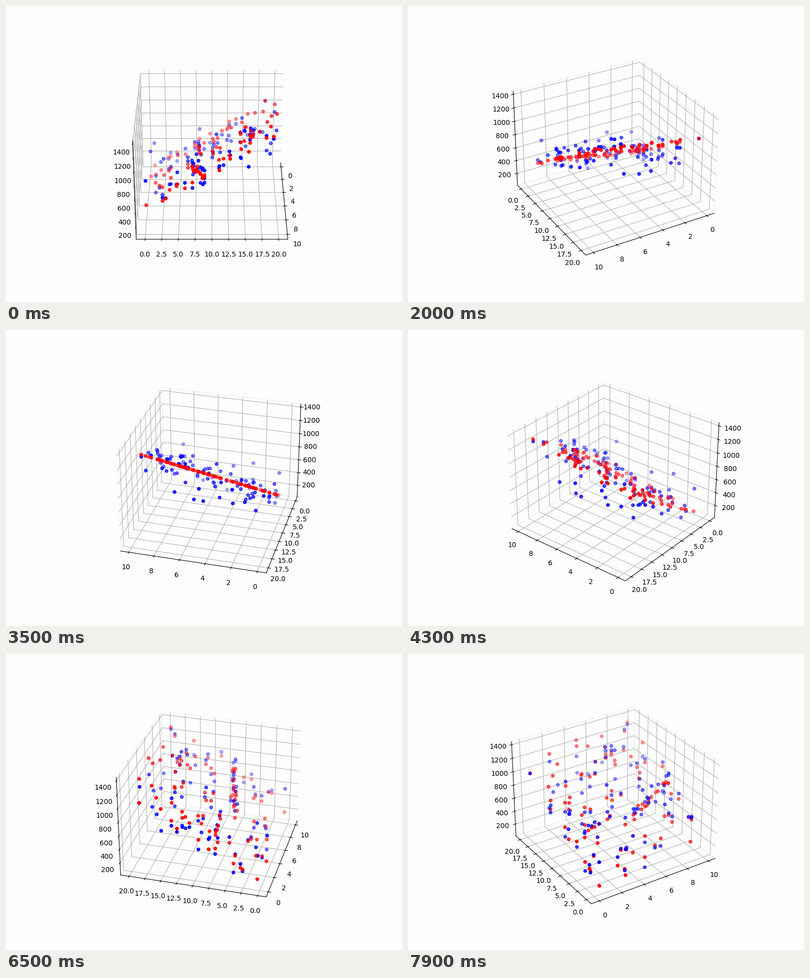
A matplotlib script for the animation above (8 s loop, 800 px wide and 600 px high).

```python
import numpy as np
import matplotlib.pyplot as plt
from matplotlib.animation import FuncAnimation

FRAMES, INTERVAL, STEP = 80, 100, 3
PAPER = "#fdfdfd"

# Outer points: x, y, offset of the observed value from the fitted plane
KEY_POINTS = np.array([
    (9.15, 19.0, -30), (8.56, 18.0, 30), (9.43, 15.4, -214),
    (6.68, 18.8, -396), (4.65, 19.9, -243), (5.25, 18.4, -422),
    (4.44, 19.1, -404), (2.16, 19.8, -115), (0.04, 18.5, 0),
    (2.33, 18.0, -311), (6.47, 17.2, 0), (8.75, 12.7, 53),
    (9.89, 11.1, 61), (1.56, 16.8, -244), (0.84, 15.7, -321),
    (0.13, 12.8, -50), (0.47, 9.7, -143), (4.53, 10.7, 192),
    (0.62, 3.3, 57), (0.66, 0.7, 352), (2.85, 0.3, 388),
    (8.74, 0.1, 362),
])


def fitted(x, y):
    return 44.1 + 30.68 * x + 54.34 * y


def make_data():
    """Key points plus a high group, a tight streak and a low group."""
    rng = np.random.default_rng(12)

    def group(n, x_range, y_range, mean, spread):
        offset = np.clip(rng.normal(mean, spread, n), -330, 250)
        return np.c_[rng.uniform(*x_range, n), rng.uniform(*y_range, n), offset]

    high = group(28, (0.3, 8.4), (9.6, 16.5), -60, 120)
    streak = group(13, (6.9, 9.9), (-0.3, 0.3), 40, 105)
    streak[:, 1] += 3.6 + 0.55 * streak[:, 0]
    low = group(37, (0.2, 9.8), (0.9, 8.8), 40, 105)
    x, y, offset = np.vstack([KEY_POINTS, high, streak, low]).T
    plane = fitted(x, y)
    return x, y, np.maximum(plane + offset, 104), plane


fig = plt.figure(figsize=(8, 6), dpi=100, facecolor=PAPER)
ax = fig.add_subplot(projection="3d", facecolor=PAPER)

x, y, observed, predicted = make_data()
ax.scatter(x, y, observed, color="blue")
ax.scatter(x, y, predicted, color="red")

ax.set_xticks(np.arange(0, 11, 2))
ax.set_yticks(np.arange(0, 20.1, 2.5))
ax.set_zticks(np.arange(200, 1401, 200))
ax.set_xlim(-0.684, 10.651)
ax.set_ylim(-1.32, 21.36)
ax.set_zlim(13, 1446)
for axis in (ax.xaxis, ax.yaxis, ax.zaxis):
    axis.pane.fill = False


def update(i):
    # The tiny offset keeps the side pane from flipping at azimuth 0
    ax.view_init(elev=30, azim=STEP * i + 0.01)
    return ()


anim = FuncAnimation(fig, update, frames=FRAMES, interval=INTERVAL,
                     init_func=lambda: update(0), repeat=True, repeat_delay=0)
plt.show()
```
